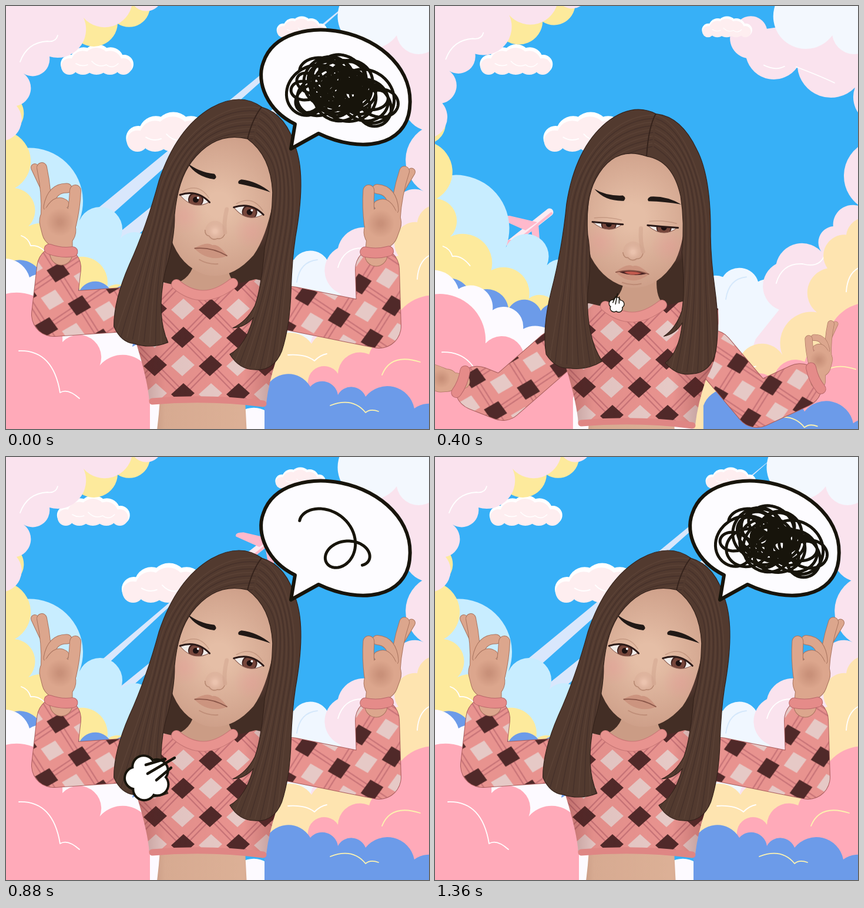
Recreate the animation shown at these times as an HTML page with a canvas. Size 720 by 720 pixels, loop 1440 ms.

```html
<!DOCTYPE html>
<html lang="en">
<head>
<meta charset="utf-8">
<title>Confused shrug</title>
<style>
html, body { margin: 0; width: 720px; height: 720px; overflow: hidden; background: #37b0f7; }
canvas { display: block; }
</style>
</head>
<body>
<canvas id="stage" width="720" height="720"></canvas>
<script>
const ctx = document.getElementById('stage').getContext('2d');
const LOOP = 1440, STEP = 80;
const INK = '#17140b', PALE = '#fae3ee', ROSE = '#ffaab9', BLUE = '#6c9be9';
const SKIN = '#dca68d', SKIN_EDGE = '#a9745f', KNIT = '#e8938f', HAIR = '#523a2f';

const clamp = v => Math.min(1, Math.max(0, v));
const easeOut = v => 1 - (1 - clamp(v)) ** 2;

// Blends four key poses: rest, look down, raise, then settle with an ease-out.
function key(u, ...poses) {
  const i = u < 400 ? 0 : u < 560 ? 1 : 2;
  const f = i < 2 ? clamp((u - 240) / 160 - i) : easeOut((u - 560) / 320);
  const mix = (a, b) => a + (b - a) * f;
  const [from, to] = [poses[i], poses[i + 1]];
  return from.map ? from.map((v, j) => mix(v, to[j])) : mix(from, to);
}

function fill(d, color) { ctx.fillStyle = color; ctx.fill(new Path2D(d)); }
function line(d, color, width) {
  ctx.strokeStyle = color; ctx.lineWidth = width;
  ctx.stroke(new Path2D(d));
}
function group(x, y, deg, scale, draw) {
  ctx.save();
  ctx.translate(x, y); ctx.rotate(deg * Math.PI / 180); ctx.scale(scale, scale);
  draw();
  ctx.restore();
}
function disc(x, y, r, color) {
  ctx.fillStyle = color;
  ctx.beginPath(); ctx.arc(x, y, r, 0, 7); ctx.fill();
}
function glow(x, y, r, inner, outer) {
  const g = ctx.createRadialGradient(x, y, r * .15, x, y, r);
  g.addColorStop(0, inner); g.addColorStop(1, outer);
  return g;
}

// Argyle knit, one repeat.
const tile = document.createElement('canvas');
tile.width = 94; tile.height = 96;
{
  const c = tile.getContext('2d');
  c.fillStyle = KNIT; c.fillRect(0, 0, 94, 96);
  c.strokeStyle = '#c87478'; c.lineWidth = 2.2;
  for (const k of [-94, 0, 94]) for (const o of [-5, 5]) {
    c.beginPath();
    c.moveTo(k + o, 0); c.lineTo(k + o + 94, 96);
    c.moveTo(k + o + 94, 0); c.lineTo(k + o, 96);
    c.stroke();
  }
  for (let i = 0; i < 3; i++) for (let j = 0; j < 3; j++) {
    const x = i * 47, y = j * 48;
    c.fillStyle = (i + j) % 2 ? '#e6c9c6' : '#502929';
    c.beginPath();
    c.moveTo(x - 20, y + 1); c.lineTo(x + 1, y - 18); c.lineTo(x + 20, y - 1); c.lineTo(x - 1, y + 18);
    c.fill();
  }
}
const knit = ctx.createPattern(tile, 'repeat');
const placeKnit = (x, y, deg = 0) => {
  knit.setTransform(new DOMMatrix().translate(x, y).rotate(deg));
  return knit;
};

// Cloud edge: one arc between each two notches, clockwise, then straight corners.
function scallop(notches, corners, bulge) {
  const p = notches.split(';').map(s => s.split(',').map(Number));
  return p.reduce((d, [x, y], i) => {
    if (!i) return `M${x} ${y}`;
    const r = bulge * Math.hypot(x - p[i - 1][0], y - p[i - 1][1]);
    return `${d}A${r} ${r} 0 0 1 ${x} ${y}`;
  }, '') + corners + 'Z';
}

function smallCloud(x, y, s) {
  const lobes = (grow, color) => {
    for (let i = 0; i < 5; i++) {
      const k = Math.sin(Math.PI * i / 4);
      disc(17 + 23 * i, 39 - 9 * k, 16 + 9 * k + grow, color);
    }
  };
  group(x, y, 0, s, () => {
    lobes(0, '#fff');
    ctx.translate(-1, 4);
    lobes(-2, '#feeef0');
    line('M28 34Q38 40 48 36M55 30Q66 42 80 36Q90 44 100 34', '#fff', 1.5);
  });
}

function plane(u) {
  const since = u - 400, p = since * (.64 - .00013 * since), w = 2 + since * .01;
  const trail = (bx, by, ax, ay) => fill(
    `M${bx - w * .64} ${by - w * .77}L${ax + p} ${ay - .825 * p}L${bx + w * .64} ${by + w * .77}Z`, '#d9e7fc');
  if (p > 40) {
    trail(142, 372, 83, 407);
    trail(188, 405, 120, 455);
  }
  group(p, -.825 * p, 0, 1, () => {
    line('M128 404L195 351', '#fdebf2', 13);
    line('M134 405L198 353', '#ffb9cc', 4);
    fill('M174 368L127 357Q112 357 114 364L154 382ZM164 382L172 428Q177 436 180 426L176 370Z', '#ffb9cc');
    fill('M134 398L112 398L122 408ZM128 406L132 427L140 402Z', '#ffb9cc');
  });
}

function background(u) {
  const away = Math.max(0, (880 - u) / 640) ** 2;
  const drift = ((LOOP - u) / 1200) ** 1.6;
  const bank = (color, dx, dy, notches, corners, { bulge = .55, curve = '', tint = '#fff' } = {}) =>
    group(dx * away, dy * away, 0, 1, () => {
      fill(scallop(notches, corners, bulge), color);
      line(curve, tint, 1.8);
    });
  ctx.fillStyle = '#37b0f7';
  ctx.fillRect(0, 0, 720, 720);
  plane(u);
  smallCloud(92 - 21 * drift, 60, 1);
  smallCloud(203 - 25 * drift, 174, 1.3);

  bank('#c8edff', -8, 82, '-45,300;125,365;195,395;242,440', 'V600H-45', { bulge: .5 });
  bank('#fdea9c', -22, 32, '12,152;8,215;15,310;38,375;108,432;172,480;220,505', 'V640H-60V152',
    { curve: 'M26 391Q38 395 42 408Q58 406 72 424' });
  bank('#fdea9c', -12, -6, '245,-5;190,30;122,58', 'H60V-5');
  bank(PALE, -10, -8, '265,-10;215,-5;132,20;74,86;30,115;18,170;-10,230', 'H-60V-60',
    { curve: 'M24 95Q36 62 70 60Q85 62 88 50' });
  bank(BLUE, 0, 55, '-10,450;62,462;125,485;180,488;240,500', 'V640H-10');
  bank('#fdfaff', 0, 35, '-40,450;40,462;98,498;150,530;215,580;300,640;400,690;462,730', 'V800H-40');
  bank(ROSE, -18, 4, '-60,560;96,572;152,624;245,665', 'V800H-60',
    { bulge: .5, curve: 'M22 587Q80 585 92 658Q105 650 125 668' });

  bank(PALE, 62, -20, '740,210;680,150;582,115;495,100;480,40;530,50', 'L740 20',
    { curve: 'M525 112Q545 122 560 114M580 115Q620 130 645 142' });
  smallCloud(460 - 8 * drift, 14, .69);
  bank('#f3f8fe', 20, 0, '740,38;665,50;575,-15', 'H740', { bulge: .5 });
  bank('#f0f7ff', 0, 52, '445,475;490,432;550,440;602,480', 'V640H445',
    { curve: 'M495 470Q500 435 530 432', tint: '#d5e8fb' });
  bank(PALE, 28, 48, '570,490;565,412;645,395;662,348;715,318;718,205', 'H780V680H480L530 540',
    { curve: 'M565 445Q575 410 610 412Q640 420 648 395' });
  bank('#fee4b0', 0, 38, '440,590;520,575;595,580;650,500;668,425;700,368;760,350', 'V760H440',
    { curve: 'M480 594Q510 592 525 604Q535 594 546 592M700 465Q702 435 720 425' });
  bank(ROSE, 20, 22, '518,655;565,626;640,628;655,570;800,560', 'V800H518',
    { bulge: .5, curve: 'M640 628Q655 590 705 606', tint: '#fdf3b0' });
  bank(BLUE, 30, 45, '440,655;518,648;565,662;612,665;695,685;760,720', 'V820H440',
    { curve: 'M552 680Q590 665 612 692Q620 685 634 690', tint: '#fdf3b0' });
}

// Hand with the wrist at the origin, fingers up.
function hand() {
  const palm = 'M-4-30L-8-46', wrist = 'M0 10L0-30';
  line(palm, SKIN_EDGE, 59);
  line(wrist, SKIN_EDGE, 39);
  const finger = (d, w) => { line(d, SKIN_EDGE, w + 2); line(d, SKIN, w); };
  finger('M-30-105L-45-137', 12);
  finger('M-26-55Q-24-95-33-137', 16);
  finger('M-22-70Q-16-103 10-102', 15);
  finger('M-22-58Q-10-85 5-75', 15);
  finger('M16-40Q23-70 24-98', 18);
  line(palm, SKIN, 57);
  line(wrist, SKIN, 37);
  disc(-2, -44, 24, glow(-2, -44, 24, 'rgba(165,105,85,.35)', 'rgba(165,105,85,0)'));
}

function arm(sx, sy, [ex, ey, wx, wy, tilt], size, flip) {
  const a = Math.atan2(wy - ey, wx - ex);
  const sleeve = `M${sx} ${sy}L${ex} ${ey}L${wx - 34 * Math.cos(a)} ${wy - 34 * Math.sin(a)}`;
  line(sleeve, '#a85d5c', 76);
  line(sleeve, placeKnit(ex - 12, ey + 22, flip * 12), 74);
  group(wx, wy, tilt, size, () => { ctx.scale(flip, 1); hand(); });
  group(wx, wy, a * 180 / Math.PI + 90, 1, () => {
    line('M-20 4Q0 9 20 4', '#b9686a', 18);
    line('M-20 4Q0 9 20 4', '#e58b89', 16);
  });
}

function body(u) {
  const sink = key(u, 31, 37, 11, 0), size = 1 - sink / 110;
  arm(228 - .6 * sink, 515 + 2 * sink, key(u,
    [178, 760, 150, 800, -90], [115, 668, 40, 638, -80],
    [62, 553, 65, 446, -8], [81, 525, 94, 412, 0]), size, 1);
  arm(486 - .4 * sink, 515 + 2 * sink, key(u,
    [530, 790, 592, 718, -95], [548, 680, 652, 632, 0],
    [630, 575, 640, 456, 0], [635, 545, 631, 414, 6]), size, -1);
  group(0, sink, 0, 1, () => {
    const side = ctx.createLinearGradient(222, 0, 465, 0);
    for (const [p, a] of [[0, .3], [.2, .04], [.75, 0], [1, .3]]) side.addColorStop(p, `rgba(95,30,30,${a})`);
    const belly = 'M262 670Q260 700 256 730L410 730L407 670Z';
    fill(belly, '#dcb096');
    fill(belly, side);
    const torso = 'M262 469Q340 490 425 465L482 478Q486 560 462 596Q447 640 443 676L244 674Q242 640 222 575Q205 500 215 478Z';
    fill(torso, placeKnit(254, 612));
    fill(torso, side);
    line('M249 673Q345 665 438 677', '#df8684', 11);
    fill('M322 420L378 420Q374 455 388 470Q340 508 290 472Q322 460 322 420Z', '#cb9c85');
    line('M290 474Q335 512 386 472', '#c77675', 18);
    line('M290 474Q335 512 386 472', KNIT, 16);
  });
}

function eye(x, lid) {
  group(x, 0, 0, 1, () => {
    const shape = `M-25 0Q0 ${lid} 25 0Q2 ${Math.max(20, lid)}-25 0Z`;
    ctx.save();
    ctx.clip(new Path2D(shape));
    fill(shape, '#f1ece9');
    disc(2, 1, 13, '#41231f');
    disc(2, 2, 11, '#76463b');
    disc(2, 1, 5, '#1c1010');
    disc(5, -3, 2, '#fff');
    ctx.restore();
    line('M-25 0Q2 20 25 0', '#8d6055', 1);
    line(`M-26-1Q0 ${lid} 26 0`, '#2b1917', 3);
    line(`M-23-8Q0 ${Math.min(lid, 0) - 12} 23-7`, 'rgba(150,100,80,.35)', 1.5);
  });
}

function face(u, look) {
  fill('M-78-60Q-40-130 15-125Q75-120 84-20Q86 40 72 75Q45 125 0 126Q-45 122-72 78Q-88 30-78-60Z',
    glow(-5, 5, 140, '#e5bea6', '#ca9a84'));
  ctx.translate(0, look);
  for (const x of [-58, 60]) disc(x, 32, 32, glow(x, 32, 32, 'rgba(235,145,150,.25)', 'rgba(235,145,150,0)'));
  const lid = key(u, -13, 0, 18, -17);
  eye(-47, lid);
  eye(47, lid);
  fill('M-73-57Q-52-46-24-49Q-17-45-22-40Q-54-37-73-57Z', '#211916');
  fill('M76-40Q50-53 23-50Q16-46 20-42Q48-43 76-40Z', '#211916');
  line('M10 5Q10 30 16 44', 'rgba(170,115,95,.16)', 7);
  disc(-1, 45, 17, glow(-1, 46, 20, 'rgba(240,200,180,.7)', 'rgba(200,150,130,.15)'));
  line('M-18 48Q-16 57-9 56Q-2 63 6 57Q14 57 16 48', '#b98a73', 1.6);
  const open = key(u, 8, 6, 0, 0);
  fill(`M-29 82Q-10 65 0 70Q10 65 29 82Q0 ${101 + open}-29 82Z`, '#cc947f');
  if (open) {
    fill(`M-24 81Q0 74 26 81Q0 ${83 + open}-24 81Z`, '#4a2322');
    fill(`M-14 81Q0 77 16 81Q0 ${82 + open}-14 81Z`, '#c1594d');
  }
  line('M-28 82Q0 73 28 82', '#8b5749', 1.8);
  line('M-16 99Q0 104 16 99', 'rgba(160,105,85,.4)', 2);
}

function frontHair(look) {
  const shape = `M22-172Q-20-190-62-152Q-112-105-121-10Q-124 70-138 140Q-150 205-140 248Q-122 272-100 269
    Q-70 272-44 254Q-74 215-76 140Q-72 80-82 40Q-90-20-74-55Q-47-115 10 ${look - 118}Q55-95 72-35Q82 10 80 60
    Q90 130 86 160Q78 190 58 205Q78 200 88 180Q86 230 63 250Q85 272 110 266Q142 262 148 225Q152 180 140 120
    Q130 70 127 30Q122-70 95-115Q65-170 22-172Z`;
  fill(shape, HAIR);
  ctx.save();
  ctx.clip(new Path2D(shape));
  for (let i = 0; i < 10; i++) {
    const tint = i % 2 ? '#46312a' : '#5b4236';
    line(`M18 ${-170 + 6 * i}C-60 ${-165 + 8 * i} ${-118 + 5 * i}-70 ${-116 + 4 * i} 20S${-126 + 6 * i} 170 ${-134 + 10 * i} 262`, tint, 1.5);
    line(`M22 ${-170 + 6 * i}C70 ${-160 + 8 * i} ${116 - 4 * i}-60 ${121 - 4 * i} 30S${138 - 6 * i} 170 ${146 - 9 * i} 262`, tint, 1.5);
  }
  line(`M22-174Q10-150 10 ${look - 118}`, '#35231c', 2);
  ctx.restore();
  line(shape, '#35231c', 1.2);
}

// Sigh puff: five lobes round a centre, drifting left as it grows and fades.
function puff(u) {
  const q = (u - 310) / 480, size = easeOut(q), alpha = clamp((1230 - u) / 250);
  if (q <= 0 || !alpha) return;
  const m = clamp((u - 400) / 800), slide = m * m * (3 - 2 * m);
  ctx.globalAlpha = alpha;
  group(309 - 105 * slide, 546 - 56 * (1 - size), -60 * (1 - clamp(q)), size, () => {
    for (const [r, color] of [[21, INK], [17, '#fff']]) {
      for (let a = .6; a < 6.8; a += Math.PI * .4) disc(20 * Math.cos(a), 20 * Math.sin(a), r, color);
      disc(0, 0, 20, color);
    }
    line('M-3-22L30-32M0-7L46-34M15 4L40-17', INK, 4.5);
  });
  ctx.globalAlpha = 1;
}

function bubble(u) {
  const size = easeOut((u - 480) / 200);
  if (!size) return;
  group(485 - 20 * (1 - size), 244 + 12 * (1 - size), 0, size, () => {
    ctx.translate(-485, -244);
    const shape = 'M492 201C445 178 425 130 438 96C455 45 520 34 570 44C640 58 695 110 687 175C680 238 605 252 532 217L485 243Z';
    fill(shape, '#fdfcff');
    line(shape, INK, 6);
  });
  if (u <= 800) return;
  const turns = 36 * ((u - 800) / 640) ** 1.47;
  ctx.beginPath();
  for (let k = 0; k <= turns; k += .02) {
    const a = Math.PI * (1 + 2 * k), r = 31 + 7 * Math.sin(2.2 * k + .6);
    const x = 66 * Math.sin(.7 * k - .6) * Math.cos(.5 * k);
    const y = 34 * Math.sin(1.7 * k - .8) * Math.cos(.6 * k);
    ctx.lineTo(572 + x + r * Math.cos(a), 142 + .25 * x + y + r * .9 * Math.sin(a));
  }
  ctx.strokeStyle = INK; ctx.lineWidth = 5;
  ctx.stroke();
}

function draw() {
  // The loop opens on its closing picture.
  const u = Math.floor(performance.now() % LOOP / STEP) * STEP || LOOP;
  ctx.lineCap = ctx.lineJoin = 'round';
  background(u);
  const [x, y, deg, look] = key(u,
    [337, 357, -1, 0], [342, 354, 3.5, 19], [361, 340, 12.8, 15], [368, 335, 13, 4]);
  const hairX = x + deg * .6;
  group(hairX, y, deg, 1, () => fill('M-100-60L-112 160L118 160L105-60Z', '#432e25'));
  body(u);
  group(x, y, deg, 1, () => face(u, look));
  group(hairX, y, deg, 1, () => frontHair(look));
  puff(u);
  bubble(u);
  requestAnimationFrame(draw);
}
draw();
</script>
</body>
</html>
```
